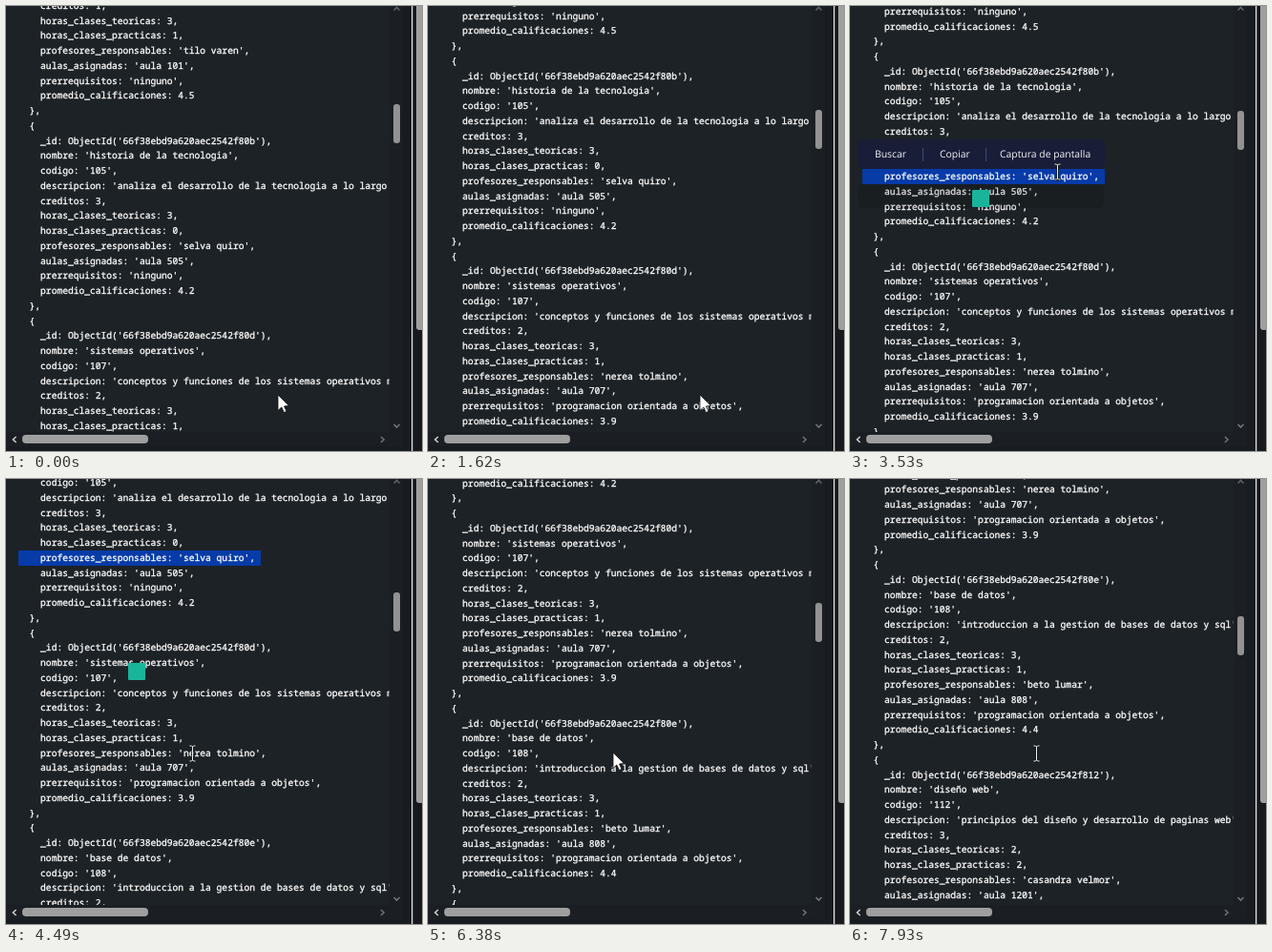
These frames come from a looping animation (436 by 467 pixels, 8000 ms). An HTML page with a canvas:

```html
<!DOCTYPE html>
<html lang="es">
<head>
<meta charset="utf-8">
<title>Cursos</title>
<style>
html, body { margin: 0; width: 100%; height: 100%; overflow: hidden; background: #1d2226; }
canvas { display: block; width: 436px; height: 467px; }
</style>
</head>
<body>
<canvas id="stage"></canvas>
<script>
const W = 436, H = 467, LOOP = 8000;
const LINE = 15.75, CHAR = 5.775, LEFT = 13, FIRST = 129;
const MONO = '9.625px "Noto Sans Mono", "DejaVu Sans Mono", monospace';
const UI = '10.4px "Open Sans", "Noto Sans", sans-serif';

const canvas = document.getElementById('stage');
const ctx = canvas.getContext('2d');
const dpr = window.devicePixelRatio || 1;
canvas.width = W * dpr;
canvas.height = H * dpr;

const KEYS = ['nombre', 'codigo', 'descripcion', 'creditos', 'horas_clases_teoricas',
  'horas_clases_practicas', 'profesores_responsables', 'aulas_asignadas',
  'prerrequisitos', 'promedio_calificaciones'];
const OOP = 'programacion orientada a objetos';
const COURSES = [
  ['0a', 'algoritmos', '104', 'fundamentos de algoritmos', 1, 3, 1, 'tilo varen', 'aula 101', 'ninguno', 4.5],
  ['0b', 'historia de la tecnologia', '105', 'analiza el desarrollo de la tecnologia a lo largo del tiempo',
    3, 3, 0, 'selva quiro', 'aula 505', 'ninguno', 4.2],
  ['0d', 'sistemas operativos', '107', 'conceptos y funciones de los sistemas operativos modernos',
    2, 3, 1, 'nerea tolmino', 'aula 707', OOP, 3.9],
  ['0e', 'base de datos', '108', 'introduccion a la gestion de bases de datos y sql',
    2, 3, 1, 'beto lumar', 'aula 808', OOP, 4.4],
  ['12', 'diseño web', '112', 'principios del diseño y desarrollo de paginas web',
    3, 2, 2, 'casandra velmor', 'aula 1201', 'ninguno', 4.1]
];

const quote = v => typeof v === 'string' ? `'${v}'` : v;
const lines = COURSES.flatMap(([id, ...values]) => [
  '  {',
  `    _id: ObjectId('66f38ebd9a620aec2542f8${id}'),`,
  ...values.map((v, i) => `    ${KEYS[i]}: ${quote(v)}${i < KEYS.length - 1 ? ',' : ''}`),
  '  },'
]);
const DOC = KEYS.length + 3;
const SELECTED = DOC + 8;

// start, end, from, to, ease-out power
const SCROLLS = [
  [0, 560, 0, 7, 2],
  [900, 1800, 7, 73, 1.6],
  [3800, 4670, 73, 170, 3],
  [4860, 5810, 170, 248, 3],
  [6200, 7290, 248, 380, 2.4],
  [7570, 8470, 380, 455, 4]
];

// start, end, from x, from y, to x, to y
const MOVES = [
  [1900, 2610, 285, 408, 227, 174],
  [2800, 3330, 227, 174, 217, 174],
  [3540, 3950, 217, 174, 195, 288]
];

const clamp = v => Math.max(0, Math.min(1, v));
const mix = (a, b, p) => a + (b - a) * p;

function scrollAt(t) {
  let s = 0;
  for (const [start, end, from, to, power] of SCROLLS)
    if (t >= start) s = mix(from, to, 1 - (1 - clamp((t - start) / (end - start))) ** power);
  return s;
}

function cursorAt(t) {
  let pos = [285, 408];
  for (const [start, end, x0, y0, x1, y1] of MOVES) {
    if (t < start) break;
    const p = clamp((t - start) / (end - start));
    const e = p * p * (3 - 2 * p);
    pos = [mix(x0, x1, e), mix(y0, y1, e)];
  }
  return pos;
}

function rect(x, y, w, h, color, r = 0) {
  ctx.fillStyle = color;
  ctx.beginPath();
  ctx.roundRect(x, y, w, h, r);
  ctx.fill();
}

function text(str, x, y, font, color, weight = 0) {
  ctx.font = font;
  ctx.fillStyle = ctx.strokeStyle = color;
  ctx.fillText(str, x, y);
  if (weight) {
    ctx.lineWidth = weight;
    ctx.strokeText(str, x, y);
  }
}

function chevron(x, y, angle, color) {
  ctx.save();
  ctx.translate(x, y);
  ctx.rotate(angle);
  ctx.beginPath();
  ctx.moveTo(-3, 1.6);
  ctx.lineTo(0, -1.6);
  ctx.lineTo(3, 1.6);
  ctx.strokeStyle = color;
  ctx.lineWidth = 1.5;
  ctx.stroke();
  ctx.restore();
}

function drawCode(scroll, selected) {
  ctx.save();
  ctx.beginPath();
  ctx.rect(0, 0, 401.5, 447);
  ctx.clip();
  ctx.lineJoin = 'round';
  lines.forEach((str, i) => {
    const y = Math.round(FIRST + (i - DOC) * LINE - scroll);
    if (y < -8 || y > 460) return;
    if (selected && i === SELECTED)
      rect(LEFT, y - 11, (str.length + 1) * CHAR, 16, '#063ba8');
    const body = str.trimStart();
    text(body, LEFT + (str.length - body.length) * CHAR, y, MONO, '#fff', 0.3);
  });
  ctx.restore();
}

function drawBars(scroll) {
  rect(402, 0, 14, 447, '#1b1f23');
  rect(0, 447, 416, 15, '#1b1f23');
  rect(0, 462, 425, 5, '#181b20');
  rect(416, 0, 9, H, '#181b20');
  rect(425, 0, 1.5, H, '#e8e8e8');
  rect(426.5, 0, 9.5, H, '#17191d');
  rect(430, -8, 8, 348, '#9f9f9f', 3);
  rect(406, Math.round(103 + scroll * 0.092), 7, 41, '#929292', 3);
  rect(17, 450, 132, 9, '#9f9f9f', 4);
  chevron(409.5, 3, 0, '#5f6368');
  chevron(409.5, 440.5, Math.PI, '#74777a');
  chevron(9, 455, -Math.PI / 2, '#d0d0d0');
  chevron(394.5, 455, Math.PI / 2, '#6f7276');
}

function drawMenu() {
  rect(8, 187, 258, 25, 'rgba(0,0,0,.12)', 5);
  rect(8, 140, 259, 31, '#191d38', 6);
  rect(76, 149, 1, 14, '#3b4d78');
  rect(142, 149, 1, 14, '#3b4d78');
  text('Buscar', 26, 159, UI, '#f4f4f8');
  text('Copiar', 94, 159, UI, '#f4f4f8');
  text('Captura de pantalla', 157, 159, UI, '#f4f4f8');
}

function drawArrow(x, y) {
  const points = [[0, 0], [0, 16.5], [3.8, 13], [6.4, 18.6], [9, 17.4], [6.5, 12], [11.5, 11.6]];
  ctx.beginPath();
  points.forEach(([px, py]) => ctx.lineTo(x + px, y + py));
  ctx.closePath();
  ctx.fillStyle = '#fff';
  ctx.fill();
  ctx.strokeStyle = '#111';
  ctx.lineWidth = 0.8;
  ctx.stroke();
}

function drawBeam(x, y) {
  x = Math.round(x) + 0.5;
  y = Math.round(y);
  ctx.beginPath();
  for (const s of [-1, 1]) {
    ctx.moveTo(x - 3, y + 8 * s);
    ctx.lineTo(x - 1, y + 8 * s);
    ctx.lineTo(x, y + 7 * s);
    ctx.lineTo(x + 1, y + 8 * s);
    ctx.lineTo(x + 3, y + 8 * s);
  }
  ctx.moveTo(x, y - 7);
  ctx.lineTo(x, y + 7);
  for (const [width, color] of [[2.4, '#15181b'], [1, '#f0f0f0']]) {
    ctx.lineWidth = width;
    ctx.strokeStyle = color;
    ctx.stroke();
  }
}

function draw(t) {
  const scroll = scrollAt(t);
  ctx.setTransform(dpr, 0, 0, dpr, 0, 0);
  ctx.textRendering = 'geometricPrecision';
  rect(0, 0, W, H, '#1d2226');
  drawCode(scroll, t >= 3060);
  drawBars(scroll);
  if (t >= 3520 && t < 3800) drawMenu();
  if (t >= 3330 && t < 6290) rect(128, 193, 18, 18, '#18b59b', 1);
  const [x, y] = cursorAt(t);
  if (t < 2560) drawArrow(x, y);
  else if (t >= 6290 && t < 7570) drawArrow(x - 1, y - 1);
  else drawBeam(x, y);
}

const begin = performance.now();
function tick() {
  draw((performance.now() - begin) % LOOP);
  requestAnimationFrame(tick);
}
tick();
</script>
</body>
</html>
```
